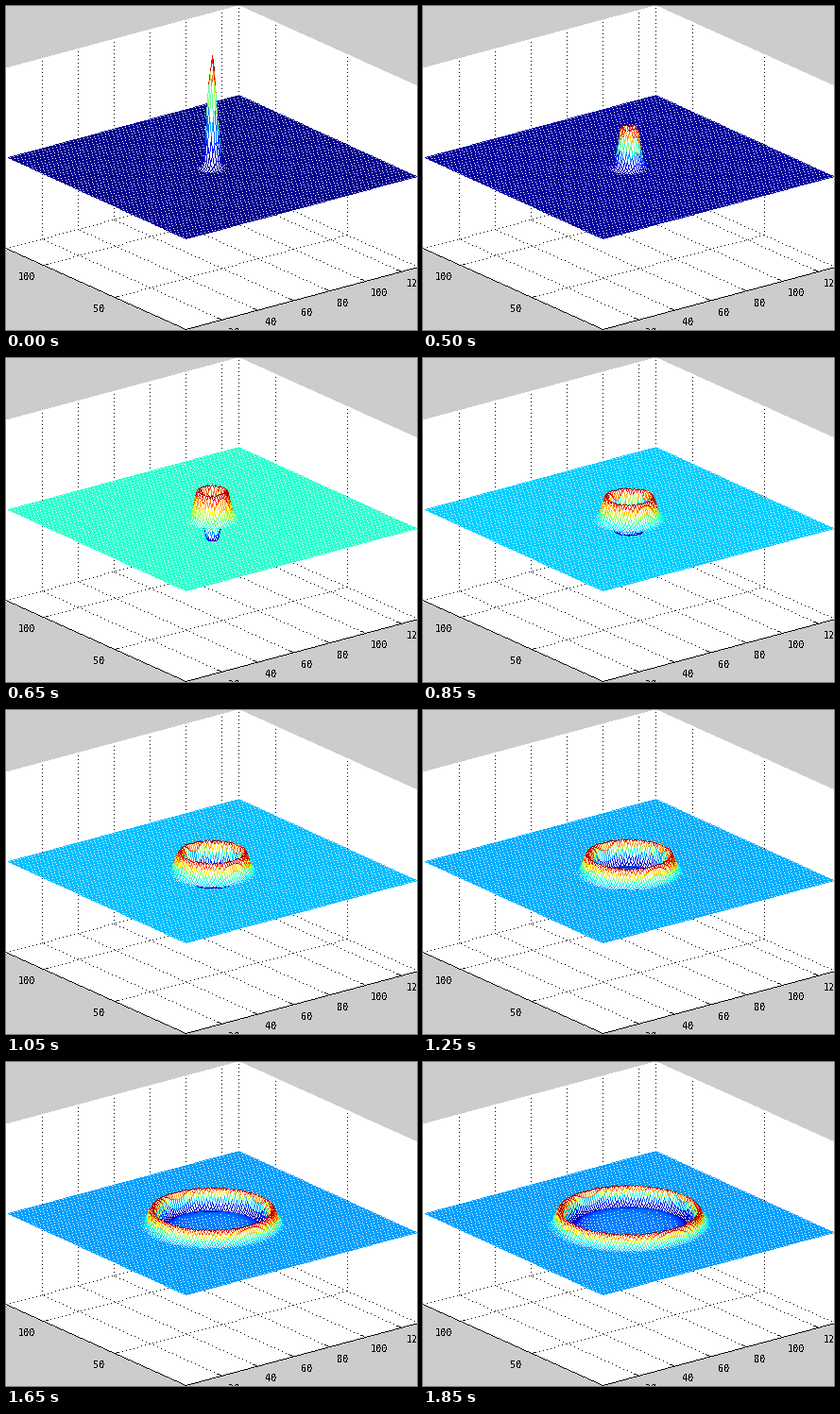
Write a matplotlib script that moves like this. It is 435 px wide and 343 px high and loops after 1900 ms.

```python
import numpy as np
import matplotlib.pyplot as plt
from matplotlib.animation import FuncAnimation

plt.rcParams["text.antialiased"] = False
plt.rcParams["font.family"] = "DejaVu Sans Mono"

W, H, DPI = 435, 343, 80
FRAMES, HOLD, INTERVAL = 38, 10, 50

# Mesh: nodes and their screen vectors in pixels
N, MID = 128, 63
ORIGIN = np.array([190.0, 246.0])
AXES = np.array([[244.0, -188.0], [-66.0, -86.0]]) / (N - 1)

# Axes box on screen: front corner and its three edges
FRONT = np.array([190.0, 342.0])
EDGE_X = np.array([246.0, -66.0])
EDGE_Y = np.array([-190.0, -85.6])
UP = np.array([0.0, -191.0])
X_UNITS, Y_UNITS = 129.5, 126.0

WHITE, BLACK, CLEAR = 64, 65, 66


def make_palette():
    """64-step jet, then white, black and transparent."""
    k = np.arange(64)
    ramp = lambda p: np.clip(np.minimum(p, 48 - p) / 16, 0, 1)
    colors = np.zeros((67, 4))
    colors[:64] = np.stack([ramp(k - 23), ramp(k - 7), ramp(k + 9), np.ones(64)], 1)
    colors[WHITE] = 1
    colors[BLACK, 3] = 1
    return (colors * 255).astype(np.uint8)


def line(buf, p, q, step=1):
    """One-pixel line; step > 1 makes it dotted."""
    p, q = np.asarray(p), np.asarray(q)
    n = int(np.abs(q - p).max())
    t = np.arange(0, n + 1, step)[:, None] / n
    x, y = np.floor(p + (q - p) * t + 0.5).astype(int).T
    ok = (x >= 0) & (x < W) & (y >= 0) & (y < H)
    buf[y[ok], x[ok]] = BLACK


def toward(v, length=5):
    return v / np.hypot(*v) * length


def make_base():
    """Dotted grid, axis lines and the white sheet below the mesh."""
    buf = np.full((H, W), CLEAR)
    left, right = FRONT + EDGE_Y, FRONT + EDGE_X
    back = left + EDGE_X
    for k in range(20, 121, 20):
        p = FRONT + EDGE_X * k / X_UNITS
        wall = p + EDGE_Y
        line(buf, p, wall, 4)
        line(buf, wall, wall + UP, 4)
        line(buf, p, p + toward(EDGE_Y))
    for k in (50, 100):
        p = FRONT + EDGE_Y * k / Y_UNITS
        wall = p + EDGE_X
        line(buf, p, wall, 4)
        line(buf, wall, wall + UP, 4)
        line(buf, p, p + toward(EDGE_X))
    for p, q in ((left, back), (right, back), (back, back + UP)):
        line(buf, p, q, 4)
    line(buf, FRONT, left)
    line(buf, FRONT, right)

    yy, xx = np.mgrid[:H, :W]
    rel = np.stack([xx.ravel() - ORIGIN[0], yy.ravel() - ORIGIN[1]])
    ij = np.linalg.solve(AXES, rel)
    sheet = ((ij >= 0) & (ij <= N - 1)).all(0)
    buf[sheet.reshape(H, W)] = WHITE
    return buf


jj, ii = np.mgrid[:N, :N]
BUMP = np.exp(-((ii - MID) ** 2 + (jj - MID) ** 2) / (2 * 1.8 ** 2))
SPECTRUM = np.fft.fft2(BUMP)
FREQ = 2 * np.pi * np.fft.fftfreq(N)
OMEGA = np.hypot(FREQ[:, None], FREQ[None, :])


def height(step):
    """Wave height in pixels: a bump at rest, then the spreading ring."""
    if step == 0:
        return 119 * BUMP
    u = 160 * np.fft.ifft2(SPECTRUM * np.cos(OMEGA * (step + 1.375))).real
    return np.where(u < 0, 0.72 * u, u)


def corners(a):
    """Four corners of each cell, far cells first."""
    cells = (a[:-1, :-1], a[:-1, 1:], a[1:, :-1], a[1:, 1:])
    return np.stack([c[::-1, ::-1].ravel() for c in cells], 1)


def stamp(buf, x, y, c, faces):
    """Paint cells in order: white face, then the four coloured edges."""
    start, end = [1, 2, 0, 0], [3, 3, 1, 2]
    x0, y0 = x[:, start, None], y[:, start, None]
    dx, dy = x[:, end, None] - x0, y[:, end, None] - y0
    size = np.maximum(np.maximum(abs(dx), abs(dy)), 1)
    n = int(size.max())
    t = np.minimum(np.arange(n + 1) / size, 1)
    ex = np.floor(x0 + dx * t + 0.5).astype(int)
    ey = np.floor(y0 + dy * t + 0.5).astype(int)
    pos = (ey * W + ex).reshape(len(x), -1)
    col = np.repeat(c[:, start], n + 1, axis=1)
    if faces:
        s, r = (g.ravel() for g in np.meshgrid(*[np.linspace(0, 1, 2 * n + 1)] * 2))
        weights = np.stack([(1 - s) * (1 - r), s * (1 - r), (1 - s) * r, s * r])
        fx, fy = x @ weights, y @ weights
        px, py = np.rint(fx), np.rint(fy)
        near = (abs(fx - px) < 0.26) & (abs(fy - py) < 0.26)
        corner = (y[:, :1] * W + x[:, :1]).astype(int)
        fill = np.where(near, (py * W + px).astype(int), corner)
        pos = np.concatenate([fill, pos], 1)
        col = np.concatenate([np.full(fill.shape, WHITE), col], 1)
    pos, col = pos.ravel(), col.ravel()
    ok = (pos >= 0) & (pos < W * H)
    buf.reshape(-1)[pos[ok]] = col[ok]


def render(step):
    u = height(step)
    lo, hi = u.min(), u.max()
    shade = np.clip((u - lo) / (hi - lo) * 64, 0, 63).astype(int)
    px = np.floor(ORIGIN[0] + AXES[0, 0] * ii + AXES[0, 1] * jj + 0.5)
    py = np.floor(ORIGIN[1] + AXES[1, 0] * ii + AXES[1, 1] * jj - u + 0.5)
    px = np.clip(px, 0, W - 1)
    x, y, c, z = (corners(a) for a in (px, py, shade, u))
    steep = np.ptp(z, axis=1) > 0.6
    buf = BASE.copy()
    stamp(buf, x[~steep], y[~steep], c[~steep], False)
    stamp(buf, x[steep], y[steep], c[steep], True)
    return PALETTE[buf]


PALETTE = make_palette()
BASE = make_base()
pictures = [render(step) for step in range(FRAMES - HOLD + 1)]

fig = plt.figure(figsize=(W / DPI, H / DPI), dpi=DPI, facecolor="#cccccc")
ax = fig.add_axes([0, 0, 1, 1])
ax.axis("off")

walls = (FRONT, FRONT + EDGE_X, FRONT + EDGE_X + UP, FRONT + EDGE_X + EDGE_Y + UP,
         FRONT + EDGE_Y + UP, FRONT + EDGE_Y)
ax.add_patch(plt.Polygon(walls, fc="white", ec="none", antialiased=False, zorder=0))


def label(x, y, value):
    ax.text(x, y + 1, str(value), size=9.25, ha="center", va="center", zorder=1)


for k in range(6):
    label(241.3 + 38.3 * k, 344.4 - 10.4 * k, 20 * (k + 1))
label(98, 319.5, 50)
label(21, 285.5, 100)

view = ax.imshow(pictures[0], interpolation="nearest", aspect="auto", zorder=2)
ax.set_xlim(-0.5, W - 0.5)
ax.set_ylim(H - 0.5, -0.5)


def update(frame):
    view.set_data(pictures[max(0, frame - HOLD + 1)])
    return [view]


anim = FuncAnimation(fig, update, frames=FRAMES, interval=INTERVAL,
                     repeat=True, repeat_delay=0, blit=False)
plt.show()
```
